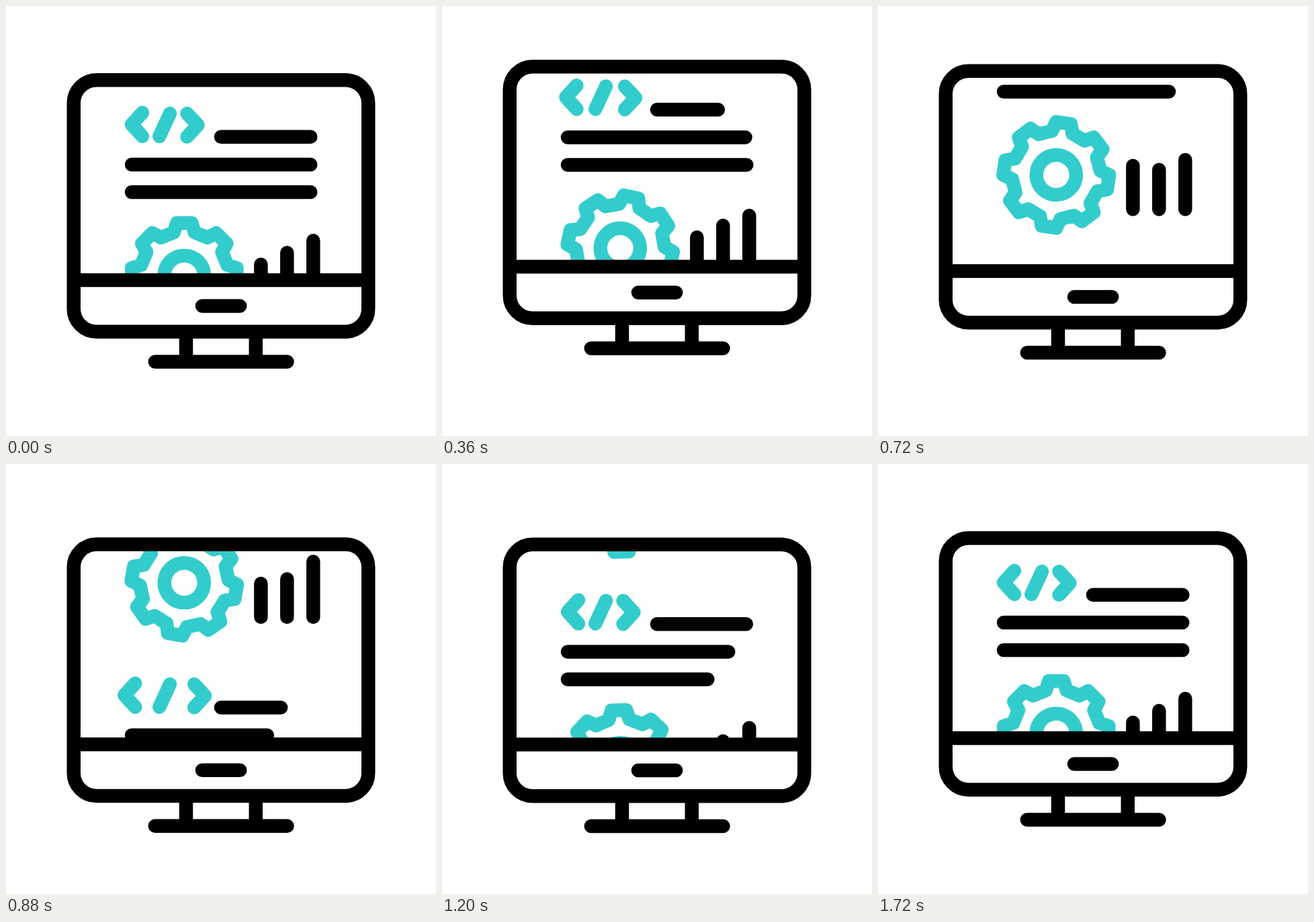
These frames come from a looping animation (640x640 px, 1960 ms). An HTML page:

```html
<!DOCTYPE html>
<html lang="en">
<head>
<meta charset="utf-8">
<title>Scrolling monitor</title>
<style>
  html, body { margin: 0; width: 100%; height: 100%; overflow: hidden; background: #fff; }
  svg { display: block; width: 100vw; height: 100vh; }
  .ink, .teal { fill: none; stroke: #000; stroke-width: 20.5; stroke-linecap: round; stroke-linejoin: round; }
  .teal { stroke: #33cccc; }
  .flat { stroke-linecap: butt; }
</style>
</head>
<body>
<svg viewBox="0 0 640 640">
  <defs>
    <clipPath id="screen"><rect x="101" y="110" width="438" height="298"/></clipPath>
    <g id="page">
      <g class="teal">
        <path id="left" d="M203 158.8L187 176.3L203 194"/>
        <path d="M244 160L228.3 194"/>
        <path id="right" d="M269.5 160L285.5 177.3L269.5 194.6"/>
        <path id="gear"/>
        <circle cx="265.3" cy="401" r="29.6"/>
      </g>
      <g class="ink">
        <path id="line0"/><path id="line1"/><path id="line2"/>
        <path id="bar0"/><path id="bar1"/><path id="bar2"/>
      </g>
    </g>
  </defs>
  <g id="monitor">
    <g clip-path="url(#screen)">
      <g id="scroll">
        <use href="#page"/>
        <use href="#page" y="392"/>
      </g>
    </g>
    <g class="ink">
      <rect x="100.75" y="110.25" width="438.5" height="374.5" rx="34"/>
      <path class="flat" d="M101 408H539M268 485V530M371.8 485V530"/>
      <path d="M292 446.5H348.2M221.8 529.5H418.5"/>
    </g>
  </g>
</svg>
<script>
const LOOP = 1960, STEP = 40, PAGE = 392;
const HUB = { x: 265.3, y: 401 };
const $ = id => document.getElementById(id);
const clamp = u => Math.max(0, Math.min(1, u));

// Smooth step from 0 to 1 between two times
function ease(t, from, to) {
  const u = clamp((t - from) / (to - from));
  return u * u * (3 - 2 * u);
}

// Smooth rise and fall, 0 - 1 - 0
function bump(t, from, to) {
  return (1 - Math.cos(2 * Math.PI * clamp((t - from) / (to - from)))) / 2;
}

// Rising curve through [time, value] knots, flat at both ends
function curve(knots) {
  const last = knots.length - 1;
  const gap = i => knots[i + 1][0] - knots[i][0];
  const rate = i => (knots[i + 1][1] - knots[i][1]) / gap(i);
  const slope = knots.map((_, i) => {
    if (i === 0 || i === last) return 0;
    const a = rate(i - 1), b = rate(i), h = gap(i - 1), k = gap(i);
    return Math.min((a * k + b * h) / (h + k), 3 * a, 3 * b);
  });
  return t => {
    if (t <= knots[0][0]) return knots[0][1];
    if (t >= knots[last][0]) return knots[last][1];
    let i = 0;
    while (t > knots[i + 1][0]) i++;
    const h = gap(i), u = (t - knots[i][0]) / h, v = 1 - u;
    return knots[i][1] * v * v * (1 + 2 * u) + knots[i + 1][1] * u * u * (3 - 2 * u)
      + h * u * v * (slope[i] * v - slope[i + 1] * u);
  };
}

const scrolled = curve([[50, 0], [360, 20.5], [720, 136], [880, 233.5], [1200, 358], [1400, 385], [1640, PAGE]]);
const turned = curve([[50, 0], [360, 12], [720, 98], [880, 145], [1200, 178.5], [1340, 180]]);

const lines = [
  { x: 320, y: 194.7, dip: 71, from: 20, to: 1230 },
  { x: 187, y: 236, dip: 64.5, from: 300, to: 1460 },
  { x: 187, y: 277, dip: 64.5, from: 500, to: 1660 }
];
const bars = [
  { x: 379.4, y: 384.7, from: 635, to: 1510 },
  { x: 418.3, y: 367.2, from: 370, to: 1270 },
  { x: 457.3, y: 349.2, from: 260, to: 1160 }
];

function gearPath(teeth) {
  const pts = [];
  const add = (r, deg) => {
    const a = deg * Math.PI / 180;
    pts.push((HUB.x + r * Math.sin(a)).toFixed(2) + " " + (HUB.y - r * Math.cos(a)).toFixed(2));
  };
  for (let i = 0; i < teeth; i++) {
    const mid = i * 360 / teeth;
    add(66, mid - 13.5);
    add(78.8, mid - 8);
    add(78.8, mid + 8);
    add(66, mid + 13.5);
  }
  return "M" + pts.join("L") + "Z";
}

const move = (id, x, y) => $(id).setAttribute("transform", `translate(${x} ${y})`);

function draw(t) {
  const lift = -25 * ease(t, 60, 480) + 37 * ease(t, 592, 938) - 12 * ease(t, 1082, 1490);
  move("monitor", 0, lift);
  move("scroll", 0, -scrolled(t));

  const spread = 14.8 * bump(t, 230, 1190);
  move("left", -spread, 0);
  move("right", spread, 0);
  $("gear").setAttribute("transform", `rotate(${turned(t)} ${HUB.x} ${HUB.y})`);

  lines.forEach((l, i) => {
    const end = 453.3 - l.dip * bump(t, l.from, l.to);
    $("line" + i).setAttribute("d", `M${l.x} ${l.y}H${end}`);
  });
  bars.forEach((b, i) => {
    const top = b.y + 29.5 * bump(t, b.from, b.to);
    $("bar" + i).setAttribute("d", `M${b.x} ${top}V452`);
  });
}

$("gear").setAttribute("d", gearPath(8));

const start = performance.now();
function tick() {
  const t = Math.max(0, performance.now() - start) % LOOP;
  draw(t < 2 * STEP ? 0 : Math.min(1720, Math.floor(t / STEP) * STEP));
  requestAnimationFrame(tick);
}
tick();
</script>
</body>
</html>
```
